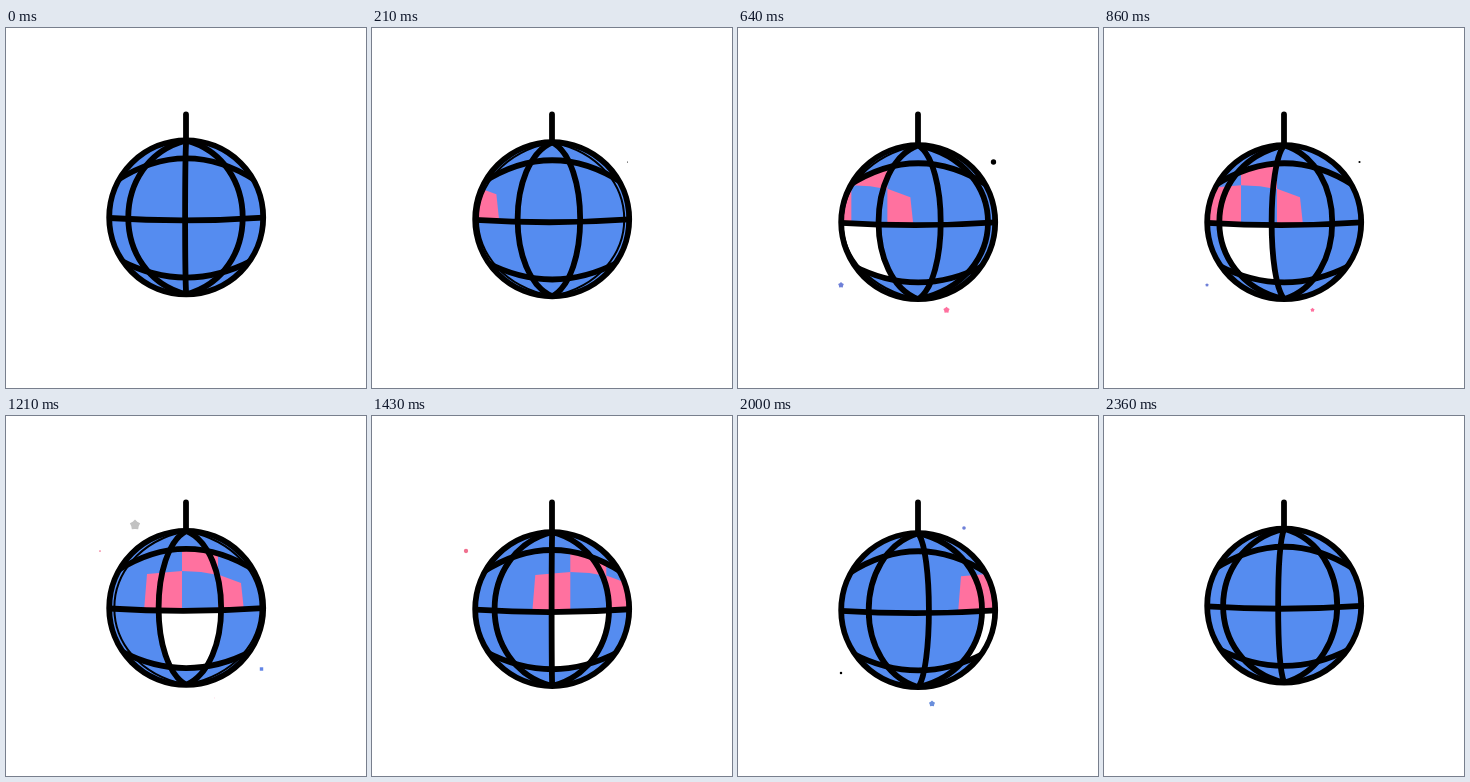
Write an HTML page with a canvas that moves like this. It is 360 px wide and 360 px high and loops after 2430 ms.

```html
<!DOCTYPE html>
<html lang="en">
<head>
<meta charset="utf-8">
<title>Disco ball</title>
<style>
html, body { margin: 0; width: 100%; height: 100%; overflow: hidden; background: #fff; }
canvas { display: block; width: 100vw; height: 100vh; }
</style>
</head>
<body>
<canvas id="stage"></canvas>
<script>
const SIZE = 360, LOOP = 2430, FPS = 14, STEPS = 34;
const CX = 180.2, CY = 189.4, R = 77, CELL = 48, LINE = 5.8;
const BLUE = '#558cf0', PINK = '#ff719f', VIOLET = '#6f80d8', INK = '#000';

// [step, value] tables
const BOB = [[0, 0], [7, 4.8], [12, 4.8], [17, 2.5], [23, 4.8], [28, 4.8], [34, 0]];
const TURN = [[0, -0.8], [6, 43.4], [12, 86.6], [17, 123], [24, 171], [28, 200], [33, 235.5], [34, 239.2]];
const SLIDE = [[0, -135], [6, -86.3], [12, -39], [17, 0], [24, 52], [28, 82], [34, 128]];

// x, y, colour, shape, largest radius, first, peak and last step
const SPARKS = [
  [215.5, 108.3, BLUE, 'dot', 2.5, 3, 6, 9],
  [255.5, 134, INK, 'dot', 3.2, 2, 8, 14],
  [103, 257, VIOLET, 'star', 3, 4, 9, 17],
  [208.5, 282, PINK, 'star', 3.3, 6, 9, 18],
  [129, 109, '#c2c2c2', 'star', 5.4, 14, 17, 20],
  [94, 135, '#f0708f', 'dot', 2.6, 15, 21, 28],
  [255.5, 253, '#6285e6', 'square', 3, 13, 15.5, 19],
  [226, 112, VIOLET, 'dot', 3, 21, 26, 31],
  [103, 257, INK, 'dot', 2.5, 20, 24, 32],
  [194, 287.7, '#6a8fdc', 'star', 3.2, 22.5, 28, 33]
];

const canvas = document.getElementById('stage');
const ctx = canvas.getContext('2d');
const linear = u => u;
const smooth = u => (1 - Math.cos(Math.PI * u)) / 2;
const lonX = deg => R * Math.sin(Math.max(-90, Math.min(90, deg)) * Math.PI / 180);

function at(keys, n, ease) {
  let i = 1;
  while (i < keys.length - 1 && n > keys[i][0]) i++;
  const [a, p] = keys[i - 1], [b, q] = keys[i];
  return p + (q - p) * ease((n - a) / (b - a));
}

function poly(points, color) {
  ctx.beginPath();
  for (const [x, y] of points) ctx.lineTo(x, y);
  ctx.closePath();
  ctx.fillStyle = color;
  ctx.fill();
}

function disc(x, y, r, color) {
  ctx.beginPath();
  ctx.arc(x, y, r, 0, 7);
  ctx.fillStyle = color;
  ctx.fill();
}

function stroke(width) {
  ctx.lineWidth = width;
  ctx.strokeStyle = INK;
  ctx.stroke();
}

function arc(x0, y0, mid, x1, y1) {
  ctx.moveTo(x0, y0);
  ctx.quadraticCurveTo(0, 2 * mid - (y0 + y1) / 2, x1, y1);
}

// Bow between the poles, slightly pointed; dir 1 runs down, -1 runs up
function meridian(deg, dir = 1) {
  const cx = lonX(deg) * 4 / 3, cy = 0.74 * R * dir;
  ctx.lineTo(0, -R * dir);
  ctx.bezierCurveTo(cx, -cy, cx, cy, 0, R * dir);
}

function pinkTiles(dx) {
  const tile = pts => poly(pts.map(([x, y]) => [x + dx - CX, y]), PINK);
  tile([[141, -34], [176, -37], [176, 3], [138, 3]]);
  tile([[176, -66], [212, -66], [212, -33], [195, -36], [176, -37]]);
  tile([[212, -33.5], [235, -25], [238, 3], [212, 3]]);
}

function whiteTile(turn, color) {
  const left = turn - 3 * CELL, right = left + CELL;
  if (right <= -90 || left >= 90) return;
  ctx.save();
  ctx.beginPath();
  ctx.moveTo(-80, 1);
  ctx.quadraticCurveTo(0, 5, 80, 1);
  ctx.lineTo(80, 36);
  ctx.quadraticCurveTo(0, 83, -80, 36);
  ctx.clip();
  // past the limb the tile runs on to the rim
  ctx.beginPath();
  if (left <= -90) ctx.rect(-R, -R, R, 2 * R);
  if (right >= 90) ctx.rect(0, -R, R, 2 * R);
  if (ctx.isPointInPath) ctx.clip(left <= -90 || right >= 90 ? rimHalf(left <= -90) : wholeBall());
  ctx.beginPath();
  meridian(left);
  meridian(right, -1);
  ctx.fillStyle = color;
  ctx.fill();
  ctx.restore();
}

function wholeBall() {
  const p = new Path2D();
  p.arc(0, 0, R, 0, 7);
  return p;
}

function rimHalf(onLeft) {
  const p = new Path2D();
  p.rect(onLeft ? -R : 0, -R, R, 2 * R);
  return p;
}

function ball(n, cy) {
  const turn = at(TURN, n, linear);
  ctx.save();
  ctx.translate(CX, cy);
  disc(0, 0, R, BLUE);
  ctx.clip();
  pinkTiles(at(SLIDE, n, linear));
  // blue cap above the upper parallel
  ctx.beginPath();
  arc(-70, -37, -59, 70, -37);
  ctx.lineTo(70, -90);
  ctx.lineTo(-70, -90);
  ctx.fillStyle = BLUE;
  ctx.fill();
  whiteTile(turn, n > 21 && n < 27 ? '#fff6e9' : '#fff');

  for (let k = -8; k <= 3; k++) {
    const deg = turn + k * CELL;
    if (Math.abs(deg) > 80) continue;
    ctx.beginPath();
    meridian(deg);
    stroke(Math.abs(deg) > 66 ? 2 : LINE);
  }
  ctx.beginPath();
  arc(-77, 0.6, 3, 77, 0.2);
  arc(-70, -36.5, -59, 70, -36.5);
  arc(-66, 43, 60.2, 66, 43);
  stroke(LINE);
  ctx.restore();

  ctx.beginPath();
  ctx.arc(CX, cy, R, 0, 7);
  stroke(LINE);
}

function spark([x, y, color, shape, size, start, peak, end], n) {
  if (n <= start || n >= end) return;
  const r = size * (n < peak ? (n - start) / (peak - start) : (end - n) / (end - peak));
  if (shape === 'square') {
    ctx.fillStyle = color;
    ctx.fillRect(x - r, y - r, 2 * r, 2 * r);
  } else if (shape === 'star') {
    const pts = [];
    for (let i = 0; i < 10; i++) {
      const a = i * Math.PI / 5 - Math.PI / 2, d = i % 2 ? r * 0.72 : r;
      pts.push([x + d * Math.cos(a), y + d * Math.sin(a)]);
    }
    poly(pts, color);
  } else {
    disc(x, y, r, color);
  }
}

function draw(n) {
  const cy = CY + at(BOB, n, smooth);
  ctx.fillStyle = '#fff';
  ctx.fillRect(0, 0, SIZE, SIZE);
  ctx.lineCap = 'round';
  ctx.beginPath();
  ctx.moveTo(180, 86.5);
  ctx.lineTo(180, cy - R);
  stroke(LINE);
  ball(n, cy);
  for (const s of SPARKS) spark(s, n);
}

function resize() {
  const ratio = window.devicePixelRatio || 1;
  canvas.width = Math.round(innerWidth * ratio);
  canvas.height = Math.round(innerHeight * ratio);
  ctx.setTransform(canvas.width / SIZE, 0, 0, canvas.height / SIZE, 0, 0);
}

const begin = performance.now();
function tick() {
  const t = (performance.now() - begin) % LOOP;
  draw(Math.min(STEPS - 1, Math.floor((t + 5) * FPS / 1000)));
  requestAnimationFrame(tick);
}

addEventListener('resize', resize);
resize();
tick();
</script>
</body>
</html>
```
